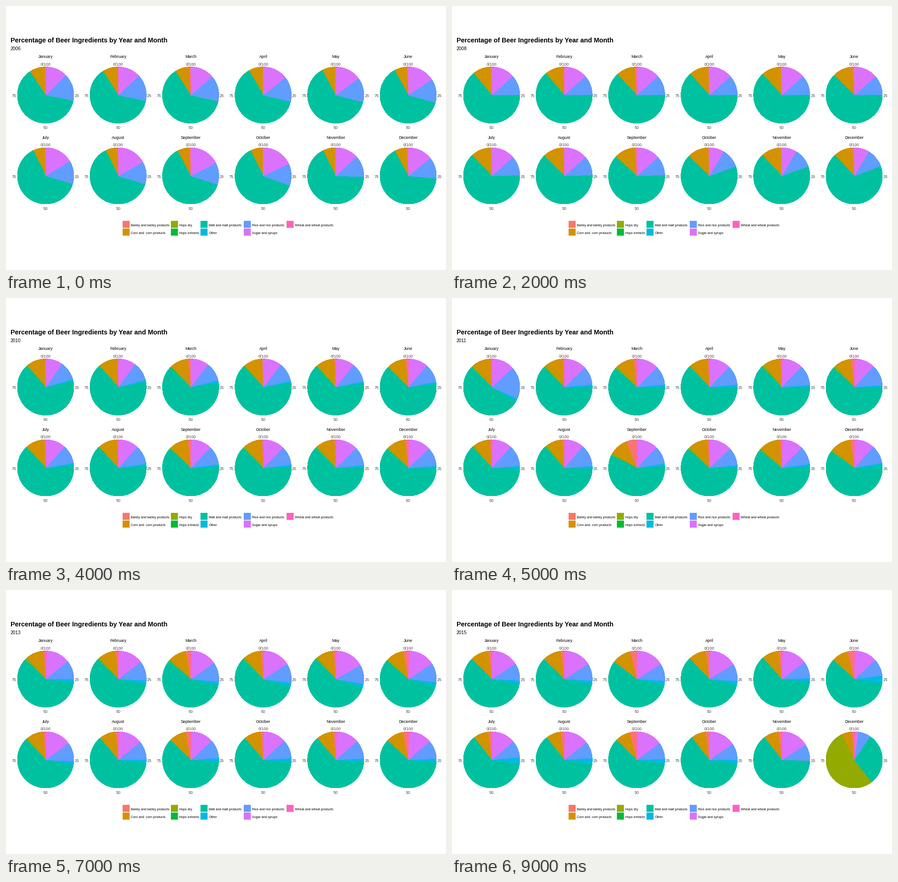
Animation of 966x580 px, one loop 10 s. Source, as a matplotlib script:

```python
import numpy as np
import matplotlib.pyplot as plt
from matplotlib.animation import FuncAnimation
from matplotlib.patches import Polygon, Rectangle

W, H, DPI = 966, 580, 100
R = 61.9
GREY = "#4D4D4D"
MONTHS = ["January", "February", "March", "April", "May", "June", "July",
          "August", "September", "October", "November", "December"]

COLORS = {
    "wheat": "#FF61C3", "sugar": "#DB72FB", "rice": "#619CFF",
    "other": "#00B9E3", "malt": "#00C19F", "extract": "#00BA38",
    "hops": "#93AA00", "corn": "#D39200", "barley": "#F8766D",
}

# Turning points of each share: (months since January 2006, percent)
TRENDS = {
    "wheat": [(47, 0.1), (60, 0.4)],
    "sugar": [(0, 12.3), (9, 17.9), (10, 13), (15, 17.8), (23, 13.2), (32, 13.4),
              (33, 8.4), (35, 8.4), (36, 12.6), (42, 11.5), (44, 9.5), (47, 9.3),
              (60, 12.8), (67, 10.8), (69, 12.6), (71, 11.2), (84, 13.5), (88, 16.2),
              (92, 12.7), (111, 15.8), (113, 12.8), (118, 15.5), (119, 1.8)],
    "rice": [(0, 15.6), (8, 12.5), (24, 11.5), (36, 10.7), (59, 10.8), (60, 18.4),
             (61, 10.5), (67, 12.7), (68, 10.3), (84, 11.2), (118, 9.5), (119, 7.2)],
    "other": [(0, 0.1), (37, 0.3), (42, 1.6), (47, 1.1), (60, 1.3), (84, 2),
              (112, 2.2), (113, 4.4), (117, 2.2), (118, 0)],
    "extract": [(0, 0.1)],
    "hops": [(0, 0.1), (14, 0.4), (47, 0.4), (62, 1.2), (90, 1.3), (91, 0.1),
             (118, 0.1), (119, 53.5)],
    "corn": [(0, 9), (6, 6.6), (15, 6.9), (16, 8.7), (33, 11.9), (35, 10.4),
             (42, 11.6), (47, 10.4), (60, 10.6), (67, 9.4), (70, 11.9), (90, 9.4),
             (110, 10.7), (114, 8.6), (118, 8.3), (119, 5.6)],
    "barley": [(0, 0.8), (47, 1.5), (67, 2.2), (68, 6.2), (69, 2.2), (118, 4.3), (119, 1.6)],
}


def ends(t):
    """Cumulative end of each slice, clockwise from the top, in month t."""
    part = {k: np.interp(t, *zip(*pts)) for k, pts in TRENDS.items()}
    if t % 3 != 2:
        part["barley"] /= 2     # barley peaks as each quarter closes
    part["malt"] = 100 - sum(part.values())
    return np.cumsum([part[k] for k in COLORS])


def sector(cx, cy, end):
    a = np.linspace(0, 2 * np.pi * end / 100, 120)
    x = np.append(cx, cx + R * np.sin(a))
    y = np.append(cy, cy - R * np.cos(a))
    return np.column_stack([x, y])


fig = plt.figure(figsize=(W / DPI, H / DPI), dpi=DPI, facecolor="white")
ax = fig.add_axes([0, 0, 1, 1])
ax.set_xlim(0, W)
ax.set_ylim(H, 0)
ax.axis("off")


def label(x, y, s, px, color="black", ha="center", **kw):
    return ax.text(x, y, s, fontsize=px * 72 / DPI, color=color, ha=ha,
                   va="baseline", family="Liberation Sans", **kw)


label(9.5, 80, "Percentage of Beer Ingredients by Year and Month", 14.35,
      ha="left", weight="bold")
subtitle = label(9.5, 97, "", 10.3, ha="left")

pies, tops = [], []
for m, name in enumerate(MONTHS):
    row, col = divmod(m, 6)
    cx, cy = 87 + 159.2 * col, 195.6 + 177.5 * row
    label(cx, cy - 81.5, name, 9)
    tops.append(label(cx, cy - 65, "", 9, GREY))
    for dx, dy, s in [(68.4, 4.5, "25"), (0, 74.5, "50"), (-69.6, 4.5, "75")]:
        label(cx + dx, cy + dy, s, 9, GREY)
    # Widest sector first, so narrower ones cover it
    slices = [ax.add_patch(Polygon(sector(cx, cy, 100), facecolor=c, lw=0,
                                   antialiased=False))
              for c in reversed(COLORS.values())]
    pies.append((cx, cy, slices))

LEGEND = [
    (256, [("Barley and barley products", "barley"), ("Corn and  corn products", "corn")]),
    (362, [("Hops dry", "hops"), ("Hops extracts", "extract")]),
    (427, [("Malt and malt products", "malt"), ("Other", "other")]),
    (522, [("Rice and rice products", "rice"), ("Sugar and syrups", "sugar")]),
    (616, [("Wheat and wheat products", "wheat")]),
]
for x, items in LEGEND:
    for row, (name, key) in enumerate(items):
        y = 472 + 17 * row
        ax.add_patch(Rectangle((x, y), 15.5, 15.5, facecolor=COLORS[key], lw=0, snap=False))
        label(x + 18.4, y + 12.3, name, 7.15, ha="left")


def draw(i):
    year = 2006 + i
    subtitle.set_text(str(year))
    for m, (cx, cy, slices) in enumerate(pies):
        tops[m].set_text("100" if year in (2007, 2009) else "0/100")
        for p, end in zip(slices, ends(12 * i + m)[::-1]):
            p.set_xy(sector(cx, cy, end))
    return []


anim = FuncAnimation(fig, draw, frames=10, init_func=lambda: draw(0),
                     interval=1000, repeat=True, blit=False)
plt.show()
```
